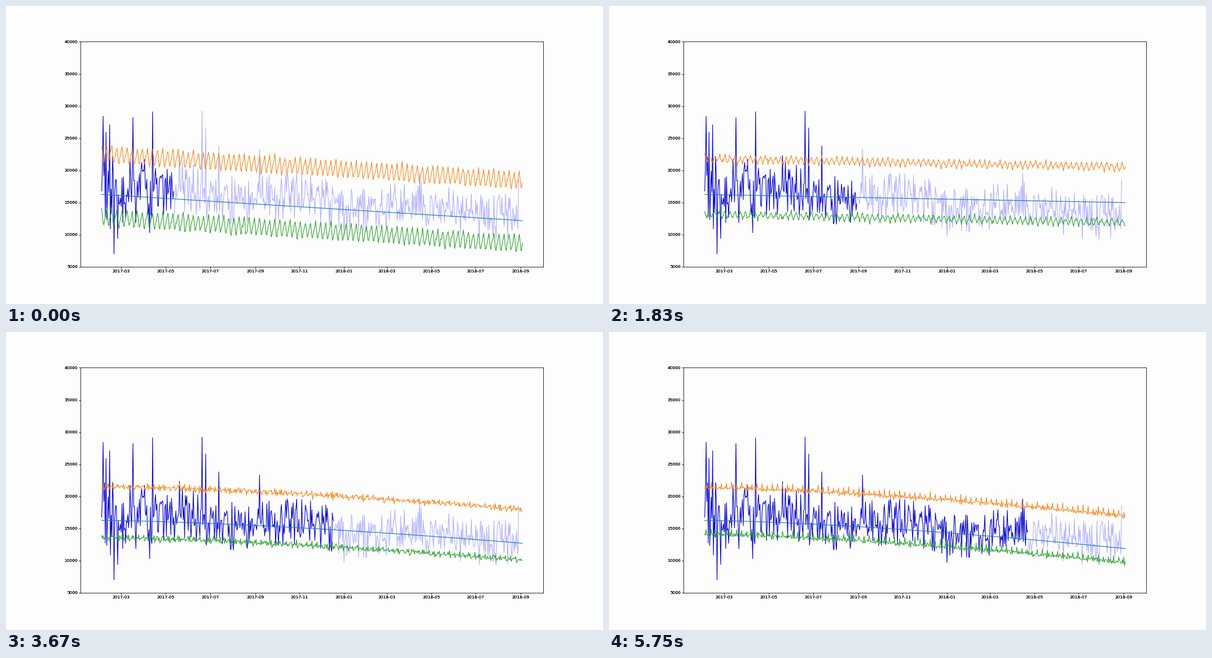
Write a matplotlib script that moves like this. It is 1058x529 px and loops after 5830 ms.

```python
import numpy as np
import matplotlib.pyplot as plt
from matplotlib.animation import FuncAnimation

LOOP_MS, TICK_MS = 5830, 22
TICKS = LOOP_MS // TICK_MS
REFITS = 70             # forecasts shown in one loop
FIRST_FIT, STEP = 100, 5
KNOWN_DAYS, LAST_DAY = 574, 578
START = np.datetime64("2017-02-02")

plt.rcParams["font.family"] = "DejaVu Sans"

# standout readings by day
PEAKS = {2: 28400, 6: 25900, 11: 27100, 17: 7000, 22: 9400, 43: 28200,
         66: 10300, 70: 29100, 107: 22300, 138: 29200, 143: 26600,
         161: 23800, 217: 23300, 333: 9700, 437: 19600, 573: 18500}

# refit number -> pixel row where the trend line ends
TREND_END = {0: 381, 3: 275, 7: 435, 17: 347, 28: 351.5, 44: 375,
             58: 405.5, 69: 384.5}

days = np.arange(LAST_DAY + 1)


def to_value(row):
    """Pixel row to axis value."""
    return 5000 + (462.9 - row) * 35000 / 399.4


def make_readings():
    rng = np.random.default_rng(12)
    t = np.arange(KNOWN_DAYS)
    mean = 17400 - 7.6 * t + 700 * np.cos(2 * np.pi * (t - 440) / 170)
    spread = 1900 + 1500 * np.exp(-t / 80)
    data = mean + spread * np.clip(rng.normal(size=t.size), -1.8, 1.8)
    data[list(PEAKS)] = list(PEAKS.values())
    return t, data


def trend_row(k):
    """Straight at first, bending downwards in the later refits."""
    end = np.interp(k, list(TREND_END), list(TREND_END.values()))
    power = 1 + 0.5 * np.clip((k - 30) / 14, 0, 1)
    return 334.5 + (end - 334.5) * (days / LAST_DAY) ** power


def weekly(k):
    """A Sunday dip that turns into a Saturday spike."""
    sun = 2 * np.pi * (days - 3) / 7
    sat = 2 * np.pi * (days - 2) / 7
    dip = 0.35 * np.sin(2 * sun) - np.cos(sun)
    spike = 0.2 * np.cos(sat) + 0.3 * np.cos(2 * sat) + 0.5 * np.cos(3 * sat)
    mix = min(k / 58, 1)
    return dip + (spike - dip) * mix


def make_axes(fig):
    ax = fig.add_axes([0.125, 0.125, 0.775, 0.755], facecolor="none")
    ax.set_xlim(-0.05 * LAST_DAY, 1.05 * LAST_DAY)
    ax.set_ylim(5000, 40000)
    months = np.arange("2017-03", "2018-10", 2, dtype="datetime64[M]")
    offsets = (months.astype("datetime64[D]") - START).astype(int)
    ax.set_xticks(offsets, months.astype(str))
    return ax


fig = plt.figure(figsize=(20, 10), dpi=52.9, facecolor="#fdfdfd")
# stacked axes give the heavy, overprinted tick labels
ax = [make_axes(fig) for _ in range(2)][-1]

t, readings = make_readings()
known, = ax.plot([], [], color="#0a0ad0", lw=1.6)
ahead, = ax.plot([], [], color="blue", alpha=0.3, lw=1.5)
trend, = ax.plot([], [], color="#1f77b4", lw=1.6, zorder=4)
upper, = ax.plot([], [], color="#f5861a", lw=1.5)
lower, = ax.plot([], [], color="#2ca02c", lw=1.5)


def update(tick):
    # the refit that is on show by the end of this tick
    k = min((tick + 1) * TICK_MS * REFITS // LOOP_MS, REFITS - 1)
    n = FIRST_FIT + STEP * k
    known.set_data(t[:n], readings[:n])
    ahead.set_data(t[n:], readings[n:])

    row = trend_row(k)
    above = 58 + 13 * np.exp(-k / 25)
    below = 41 - 17 * k / (REFITS - 1)
    wave = (8 + 5 * np.exp(-k / 15)) * weekly(k)
    jitter = np.random.default_rng(k).normal(0, 1.9, (2, days.size))
    trend.set_data(days, to_value(row))
    upper.set_data(days, to_value(row - above - wave + jitter[0]))
    lower.set_data(days, to_value(row + below - wave + jitter[1]))
    return known, ahead, trend, upper, lower


anim = FuncAnimation(fig, update, frames=TICKS, interval=TICK_MS,
                     init_func=lambda: update(0), repeat=True, repeat_delay=0)
plt.show()
```
